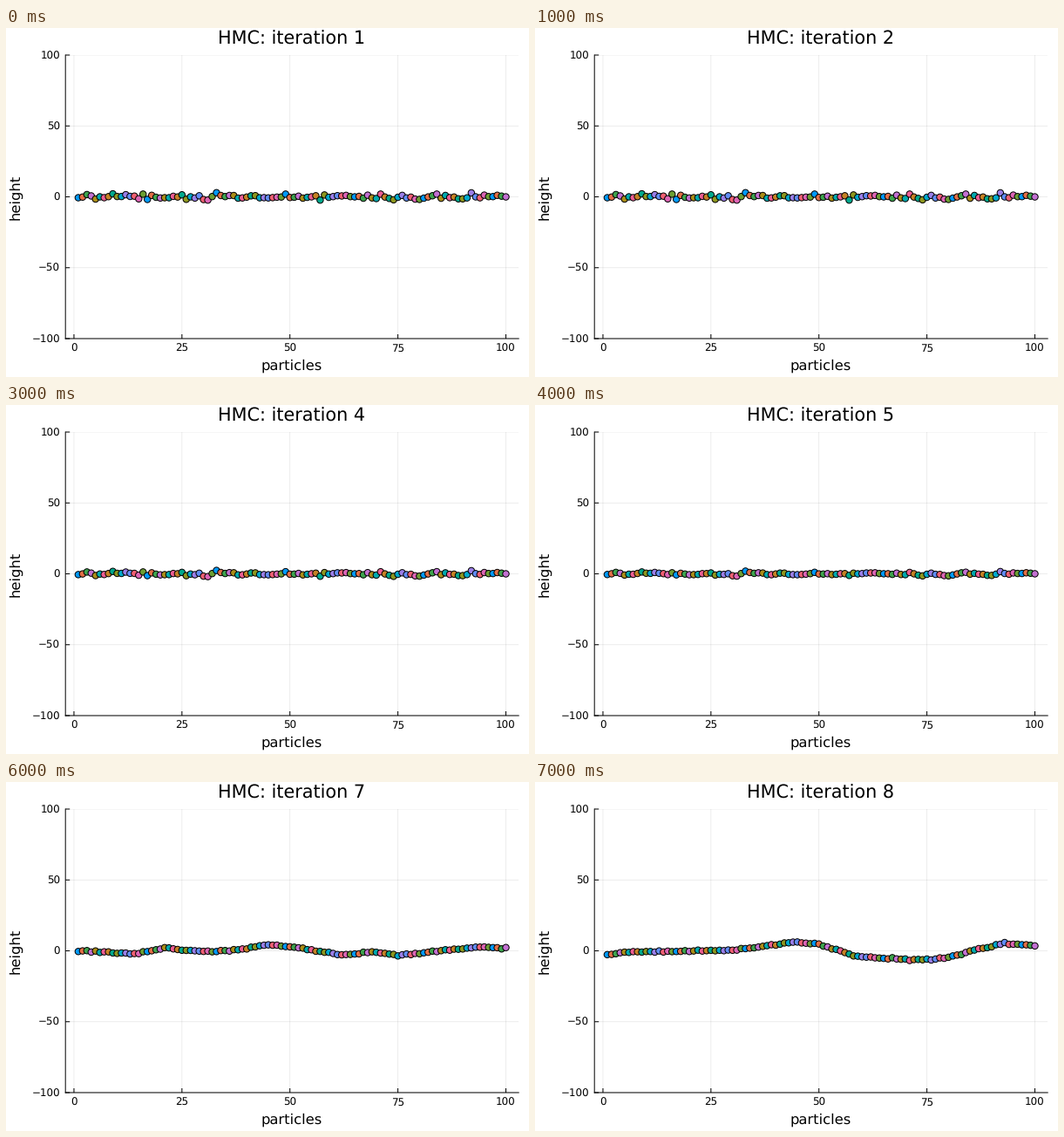
Write a matplotlib script that moves like this. It is 600x400 px and loops after 8000 ms.

```python
import matplotlib.pyplot as plt
import numpy as np
from matplotlib.animation import FuncAnimation

W, H, DPI = 600, 400, 100
PX = 72 / DPI  # points per pixel
plt.rcParams.update({"font.family": "DejaVu Sans", "text.hinting": "none",
                     "path.snap": False})

PALETTE = ["#009AFA", "#E36F47", "#3EA44E", "#C371D2", "#AC8E18", "#00AAAE",
           "#ED5E93", "#C68225", "#00A98D", "#8E971E", "#00A9CC", "#9B7FE9",
           "#618DF6", "#F06073", "#DD65B6", "#6C9F33"]

rng = np.random.default_rng(4)
particles = np.arange(1, 101)


def jitter(scale):
    return rng.normal(0, scale, particles.size).clip(-2 * scale, 2 * scale)


def relax(h):
    """Pull every particle towards its neighbours."""
    padded = np.pad(h, 1, mode="edge")
    return 0.6 * h + 0.13 * (padded[:-2] + padded[2:])


def curve(knots):
    """A chain through a few turning points, slightly roughened."""
    return np.interp(particles, list(knots), list(knots.values())) + jitter(0.3)


# Independent noise with a few particles standing out.
start = jitter(0.95)
for p, height in {9: 2.1, 31: -2.3, 33: 2.9, 57: -2.3, 74: -2.1, 92: 2.8}.items():
    start[p - 1] = height

settled = relax(start)
ripple = relax(jitter(1.1))
swell = curve({1: -0.2, 7: -0.6, 14: -2.3, 21: 1.7, 30: -0.4, 36: 0, 45: 4.2,
               50: 2.8, 62: -3, 70: -0.7, 75: -3.3, 81: -1.5, 88: 1.2,
               96: 2.5, 100: 1.8})
wave = curve({1: -2.5, 7: -0.7, 30: 0.4, 44: 6, 50: 4.5, 59: -4, 71: -6.2,
              77: -5.8, 83: -2.4, 86: 1, 93: 5.3, 100: 3.7})
states = [start, start, start, (start + settled) / 2, settled,
          ripple, swell, wave]

fig = plt.figure(figsize=(W / DPI, H / DPI), dpi=DPI, facecolor="white")
left, right, top, bottom = 68.2, 588.2, 31, 356
ax = fig.add_axes([left / W, 1 - bottom / H,
                   (right - left) / W, (bottom - top) / H])
xticks, yticks = range(0, 101, 25), range(-100, 101, 50)
ax.set(xlim=(-1.97, 102.97), ylim=(-100, 100), xticks=xticks, yticks=yticks)
ax.set_axisbelow(True)
ax.grid(color="black", alpha=0.1, lw=0.5)
ax.tick_params(length=0, labelsize=11.9 * PX)
ax.tick_params(axis="x", pad=6 * PX)
ax.tick_params(axis="y", pad=6 * PX)
ax.spines[["top", "right"]].set_visible(False)
ax.spines[["left", "bottom"]].set_linewidth(PX)

# Inward tick marks, 5 px long.
tick = dict(color="black", lw=PX, clip_on=False)
ax.vlines(xticks, 0, 5 / (bottom - top),
          transform=ax.get_xaxis_transform(), **tick)
ax.hlines(yticks, 0, 5 / (right - left),
          transform=ax.get_yaxis_transform(), **tick)


def label(x, y, text, size, **kw):
    return fig.text(x / W, 1 - y / H, text, fontsize=size * PX, **kw)


title = label(327.4, 18.3, "", 20.8, ha="center", va="baseline")
label(328, 392, "particles", 16.4, ha="center", va="baseline")
label(19, 193.5, "height", 16.4, ha="right", va="center", rotation=90)

dots = ax.scatter(particles, start, s=(7.4 * PX) ** 2, lw=PX,
                  edgecolors="black", c=[PALETTE[i % 16] for i in range(100)],
                  zorder=3, clip_on=False)


def update(i):
    title.set_text(f"HMC: iteration {i + 1}")
    dots.set_offsets(np.column_stack([particles, states[i]]))
    return title, dots


anim = FuncAnimation(fig, update, frames=len(states), interval=1000,
                     repeat=True, repeat_delay=0)
plt.show()
```
